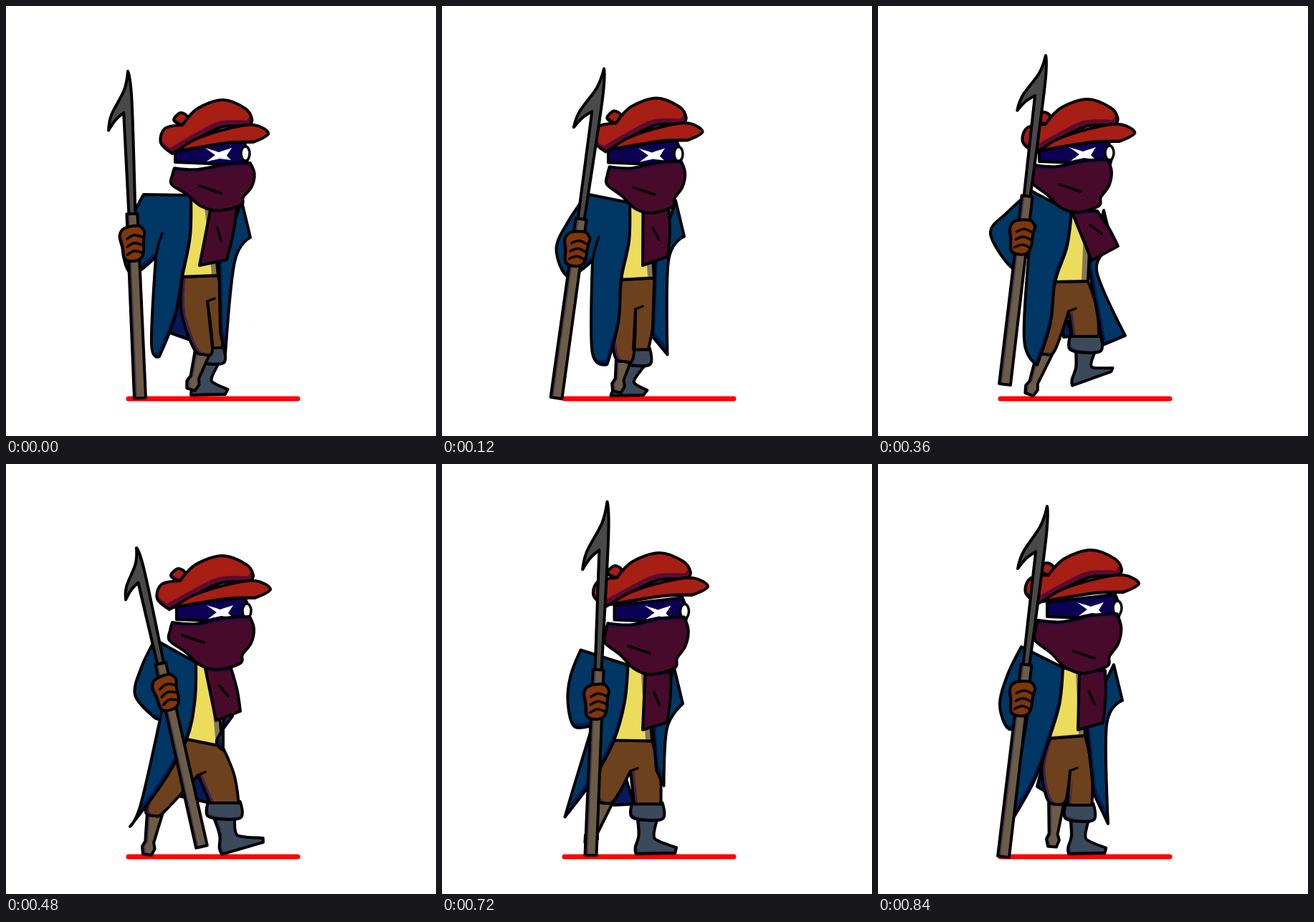
Write an HTML page with a canvas that moves like this. It is 600 px wide and 600 px high and loops after 960 ms.

```html
<!DOCTYPE html>
<html lang="en">
<head>
<meta charset="utf-8">
<title>Walk cycle</title>
<style>
html, body { margin: 0; width: 100%; height: 100%; overflow: hidden; background: #fff; }
canvas { display: block; }
</style>
</head>
<body>
<canvas id="stage" width="600" height="600"></canvas>
<script>
const ctx = document.getElementById('stage').getContext('2d');
const STEP = 120;
// Key pose held in each step; a half blends its two neighbours.
const TIMELINE = [0, 0.5, 1, 2, 3, 4, 4.5, 5];

// Fill, shade, shift of the lit area.
const COAT = ['#003764', '#031b57', -2, -6];
const FAR_COAT = ['#003764', '#031b57', 4, -5];
const LINING = ['#06195a'];
const BOOT = ['#3b4a5b', '#2b2b58', 3, -3];
const WOOD = ['#6b5c48', '#49394f', 4, 0];
const PANTS = ['#6d411d', '#40204a', 5, -2];
const SHIRT = ['#ecdc5c', '#85755f', -9, -2];
const FACE = ['#0c0055'];
const SCARF = ['#480a2b', '#310a45', -1, 5];
const HAT = ['#a61e14', '#5a0c32', -3, -8];
const BRIM = ['#a61e14', '#5a0c32', 2, -3];
const STEEL = ['#494949', '#37304a', 2, -2];
const GLOVE = ['#80360a', '#572033', 3, -2];

// Shapes in their own coordinates.
const hatShape = [[17, 75], [0, 60], [6, 40], [32, 35], [54, 12], [91, 0], [124, 12], [134, 27], [129, 37], [89, 38], [51, 56]];
const brimShape = [[24, 72], [51, 55], [99, 40], [137, 35], [158, 47], [136, 59], [99, 60], [59, 66]];
const pomShape = [[19, 28], [29, 18], [39, 24], [32, 35]];
const faceShape = [[-98, -8], [-3, -19], [5, 0], [1, 16], [-98, 12]];
const starShape = [[-56, -8], [-37, -2], [-19, -8], [-26, 3], [-20, 9], [-36, 7], [-54, 11], [-42, 2]];
const scarfShape = [[4, 8], [37, 10], [77, 2], [112, 0], [118, 17], [114, 37], [102, 53], [99, 65], [67, 74], [42, 67], [22, 49], [0, 33], [1, 19]];
const bootShape = [[.05, 0], [.52, .02], [.45, .46], [.55, .62], [1, .82], [.97, .98], [.02, 1], [0, .82], [.08, .48]];
const bladeShape = [[0, 0], [-6, .13], [-25, .3], [-30, .41], [-20, .34], [-8, .29], [-6, 1], [3, 1], [4, .2]];
const handShape = [[-20, -12], [-13, -22], [7, -25], [15, -16], [13, -4], [13, 8], [10, 19], [0, 24], [-14, 21], [-17, 4]];

// Tracks: one entry for each key pose.
const hat = [[216, 131, .95], [208, 126, .97], [202, 130, .99], [211, 128, 1], [217, 128, 1.02], [206, 120, 1]]; // x, y, stretch
const eye = [[334, 206], [326, 207], [323, 205], [336, 205], [343, 210], [334, 201]];
const scarf = [[231, 219, .98, .9], [229, 214, .87, 1.06], [215, 214, .94, 1], [228, 213, 1, 1], [236, 218, .95, 1.05], [219, 209, 1.02, 1.12]];
const scarfFold = [[285, 256], [278, 260], [268, 254], [261, 244], [263, 252], [287, 266]];
const endTop = [[286, 280], [275, 287], [270, 286], [278, 285], [286, 293], [281, 288]];
const endRight = [[308, 354], [322, 345], [335, 335], [327, 345], [314, 360], [314, 361]];
const endLeft = [[270, 362], [290, 362], [298, 355], [293, 358], [281, 371], [279, 371]];
const shoulder = [[192, 263], [213, 262], [214, 258], [208, 245], [187, 264], [200, 255]];
const collar = [[258, 264], [266, 285], [270, 288], [265, 277], [261, 277], [258, 284]];
const hem = [[214, 489], [247, 511], [222, 501], [173, 506], [156, 488], [187, 497]];
const back = [[203, 472], [216, 492], [204, 466], [188, 475], [172, 455], [190, 465]];
const armpit = [[209, 350], [211, 360], [211, 340], [215, 356], [212, 374], [208, 355]];
const elbow = [[176, 374], [176, 381], [190, 367], [205, 352], [186, 362], [183, 370]];
const sleeve = [[163, 340], [156, 338], [157, 318], [180, 322], [181, 325], [170, 337]];
const farElbow = [[341, 323], [335, 320], [327, 335], [316, 352], [331, 339], [341, 330]];
const farHem = [[306, 487], [323, 486], [345, 460], [304, 400], [298, 396], [321, 502]];
const farFront = [[299, 455], [288, 467], [314, 473], [303, 398], [297, 394], [301, 460]];
const waistLeft = [[246, 378], [254, 386], [247, 385], [252, 384], [241, 388], [239, 383]];
const waistRight = [[296, 376], [296, 383], [293, 384], [302, 394], [297, 394], [289, 379]];
const crotch = [[281, 412], [259, 434], [266, 426], [268, 434], [258, 429], [268, 428]];
const lining = [[226, 455], [260, 450], [259, 462], [244, 464], [258, 502], [222, 450]];
const boot = [[257, 498, 50, 45, 14, 0], [212, 503, 45, 42, 35, 0], [270, 482, 57, 48, 3, 20],
  [300, 494, 61, 51, -13, 17], [274, 494, 62, 50, 0, 0], [265, 497, 53, 47, 1, 0]]; // x, y, width, height, lean, toe lift
const peg = [[275, 480, 258, 535], [233, 500, 230, 542], [234, 480, 211, 542],
  [208, 485, 197, 545], [208, 466, 167, 526], [249, 469, 243, 534]]; // knee, foot
const spear = [[170, 91, 187, 547, 199, 241], [282, 84, 132, 547, 225, 268], [234, 69, 177, 528, 198, 256],
  [182, 117, 273, 534, 165, 207], [225, 46, 240, 544, 247, 289], [236, 59, 175, 548, 223, 271]]; // tip, foot, joint, grip

const mix = (a, b, t = .5) => a.map((v, i) => v + (b[i] - v) * t);
const shift = ([x, y], dx, dy) => [x + dx, y + dy];
const place = (shape, x, y, sx = 1, sy = 1) => shape.map(p => [x + p[0] * sx, y + p[1] * sy]);

// Maps (across, along) to the stage, along the axis from a to b.
function axis(ax, ay, bx, by) {
  const length = Math.hypot(bx - ax, by - ay);
  const dx = (bx - ax) / length, dy = (by - ay) / length;
  return { length, map: ([v, u]) => [ax + dx * u + dy * v, ay + dy * u - dx * v] };
}

// Smooth curve through the points; sharp points have no tangent.
function curve(points, sharp, closed) {
  const n = points.length, path = new Path2D();
  const at = i => points[(i + n) % n];
  const tangent = i => {
    i %= n;
    const isEnd = !closed && (i === 0 || i === n - 1);
    if (isEnd || sharp === 'all' || sharp.includes(i)) return [0, 0];
    return [0, 1].map(k => (at(i + 1)[k] - at(i - 1)[k]) / 6);
  };
  path.moveTo(...points[0]);
  for (let i = 0; i < (closed ? n : n - 1); i++) {
    const p = at(i), q = at(i + 1), s = tangent(i), t = tangent(i + 1);
    path.bezierCurveTo(p[0] + s[0], p[1] + s[1], q[0] - t[0], q[1] - t[1], ...q);
  }
  if (closed) path.closePath();
  return path;
}

function outline(path, width = 4, color = '#000') {
  ctx.lineWidth = width;
  ctx.strokeStyle = color;
  ctx.stroke(path);
}

function shape(points, sharp, [fill, shade, dx, dy]) {
  const path = curve(points, sharp, true);
  ctx.save();
  ctx.clip(path);
  if (shade) {
    ctx.fillStyle = shade;
    ctx.fill(path);
    ctx.translate(dx, dy);
  }
  ctx.fillStyle = fill;
  ctx.fill(path);
  ctx.restore();
  outline(path);
}

const crease = (...points) => outline(curve(points, [], false), 3.5);

function drawLegs(at) {
  const [x, y, w, h, lean, lift] = at(boot);
  const [pegX, pegY, footX, footY] = at(peg);
  const left = at(waistLeft), right = at(waistRight), fork = at(crotch);
  const kneeX = x + lean + w * .29, half = w * .36;
  const kneeRight = [kneeX + half - 2, y - 21];
  const kneeLeft = [Math.max(kneeX - half + 2, pegX + 13), y - 21];
  const stumpLeft = [pegX - 13, pegY - 2];

  shape([left, kneeLeft, at(lining)], 'all', LINING);
  const sole = bootShape.map(([u, v]) => [x + u * w + lean * (1 - v), y + v * h - lift * u * v]);
  shape(sole, [0, 1, 4, 5, 6], BOOT);
  shape([[kneeX - half, y - 24], [kneeX + half, y - 23], [kneeX + half, y], [kneeX - half, y - 2]], [0, 1], BOOT);

  const { length, map } = axis(pegX, pegY, footX, footY);
  const side = [[11, 0], [6, length - 18], [9, length - 10], [6, length]];
  const mirrored = side.map(([v, u]) => [-v, u]).reverse();
  shape([...side, ...mirrored].map(map), 'all', WOOD);

  shape([left, right, shift(mix(right, kneeRight), 5, 0), kneeRight, kneeLeft, fork,
    [pegX + 13, pegY], [pegX, pegY + 6], stumpLeft, shift(mix(stumpLeft, left), -9, 0)], [0, 1, 3, 4, 5], PANTS);
  crease(fork, shift(fork, 10, -4));
}

function drawCoat(at) {
  const neck = at(collar), left = at(waistLeft), right = at(waistRight);
  const far = at(farElbow), tip = at(hem), top = at(shoulder), arm = at(sleeve), pit = at(armpit);
  shape([neck, shift(neck, 27, 8), right, left], 'all', SHIRT);
  shape([shift(far, -12, -50), far, shift(far, -22, 34), at(farHem), at(farFront), shift(right, 1, -20)], [0, 1, 3, 4, 5], FAR_COAT);
  shape([top, neck, shift(mix(neck, left), 5, 0), left, shift(mix(left, tip), 6, 0), tip, at(back),
    pit, at(elbow), arm, shift(mix(arm, top), -5, 0)], [0, 1, 5, 7], COAT);
  crease(pit, shift(pit, 4, -18), shift(pit, 9, -33));
}

function drawHead(at) {
  const [ex, ey] = at(eye);
  shape(place(faceShape, ex, ey), 'all', FACE);
  ctx.fillStyle = '#fff';
  ctx.fill(curve(place(starShape, ex, ey), 'all', true));
  const pupil = new Path2D();
  pupil.ellipse(ex, ey, 6, 10, 0, 0, 2 * Math.PI);
  ctx.fill(pupil);
  outline(pupil, 3.5);

  const top = at(endTop), topRight = shift(top, 36, 0), low = at(endRight), lowLeft = at(endLeft);
  shape([top, topRight, shift(mix(topRight, low), 2, 0), low, lowLeft, mix(lowLeft, top)], [0, 1, 3, 4], SCARF);
  crease(mix(top, low, .4), mix(top, low, .65));
  shape(place(scarfShape, ...at(scarf)), [0, 3], SCARF);
  const fold = at(scarfFold);
  crease(shift(fold, -15, -5), fold, shift(fold, 15, 5));

  const cap = at(hat);
  shape(place(pomShape, ...cap), [], BRIM);
  shape(place(hatShape, ...cap), [0, 3, 8], HAT);
  shape(place(brimShape, ...cap), [0, 5], BRIM);
}

function drawSpear(at) {
  const [tipX, tipY, footX, footY, joint, grip] = at(spear);
  const { length, map } = axis(tipX, tipY, footX, footY);
  shape(place(bladeShape, 0, 0, 1, joint).map(map), [0, 3, 5, 6, 7], STEEL);
  shape([[-9, joint], [6, joint], [8, length], [-8, length]].map(map), 'all', WOOD);
  shape(place(handShape, 0, grip).map(map), [3], GLOVE);
  for (const row of [-12, -1, 10]) {
    crease(...place([[-10, 5], [0, 0], [11, 3]], 0, grip + row).map(map));
  }
}

function render() {
  const key = TIMELINE[Math.floor(performance.now() / STEP) % TIMELINE.length];
  const at = track => mix(track[Math.floor(key)], track[Math.ceil(key)], key % 1);
  ctx.fillStyle = '#fff';
  ctx.fillRect(0, 0, 600, 600);
  ctx.lineCap = ctx.lineJoin = 'round';
  outline(new Path2D('M171 548H407'), 7, '#f00');
  drawLegs(at);
  drawCoat(at);
  drawHead(at);
  drawSpear(at);
  requestAnimationFrame(render);
}
render();
</script>
</body>
</html>
```
